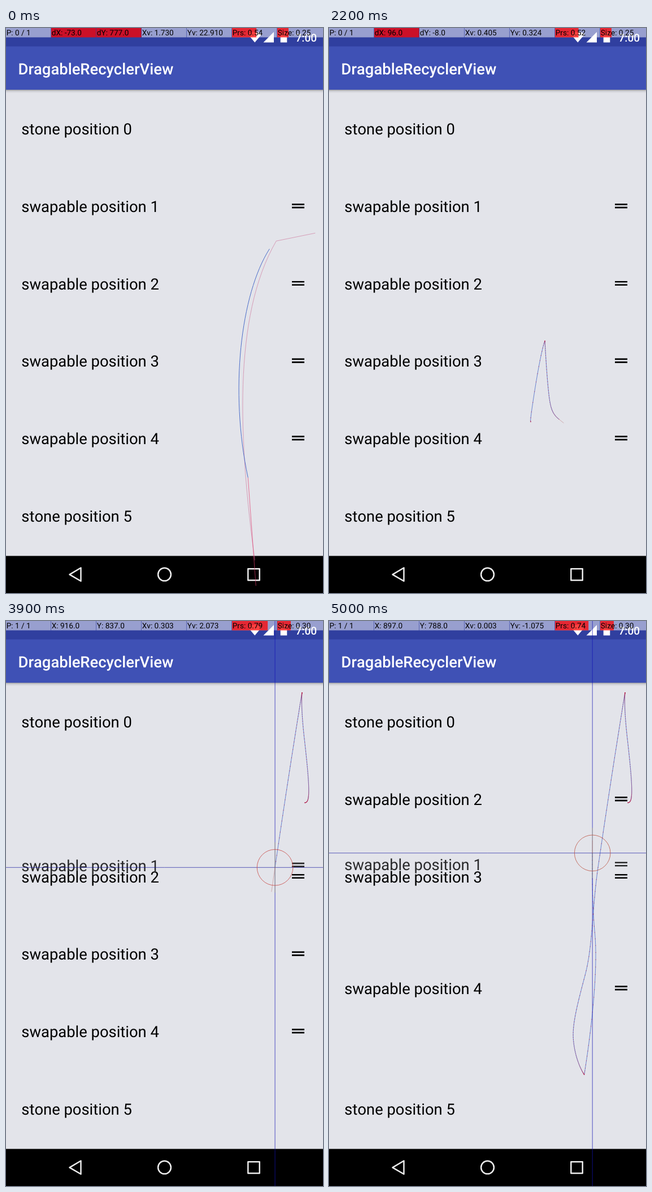
Animation, 561 px wide and 998 px high, one loop 5100 ms. Source, as an HTML page with a canvas:

```html
<!DOCTYPE html>
<html lang="en">
<head>
<meta charset="utf-8">
<title>Draggable list</title>
<style>
  html, body { margin: 0; width: 100%; height: 100%; overflow: hidden; background: #000; }
  svg, canvas { position: absolute; left: 0; top: 0; width: 561px; height: 998px; display: block; }
  text {
    font-family: Roboto, "Noto Sans", sans-serif; white-space: pre;
    font-kerning: none; text-rendering: geometricPrecision;
  }
  .row text { font-size: 27.4px; }
  .title { font-size: 27.4px; font-weight: 500; fill: #fff; }
  .clock { font-size: 19.1px; font-weight: 500; fill: #fff; }
  .cell text { font-size: 13.6px; }
</style>
</head>
<body>
<svg viewBox="0 0 561 998">
  <defs>
    <linearGradient id="shade" x2="0" y2="1">
      <stop offset="0" stop-color="#000" stop-opacity=".32"/>
      <stop offset=".4" stop-color="#000" stop-opacity=".1"/>
      <stop offset="1" stop-color="#000" stop-opacity="0"/>
    </linearGradient>
  </defs>
  <rect width="561" height="998" fill="#e3e4ea"/>
  <g id="rows"></g>
  <rect y="109" width="561" height="6" fill="url(#shade)"/>
  <rect y="32" width="561" height="77" fill="#3f51b5"/>
  <rect width="561" height="32.5" fill="#303f9f"/>
  <text class="title" x="21.5" y="81.5">DragableRecyclerView</text>
  <g fill="#fff">
    <path d="M440.3 25.5 L428 11 Q440.3 2 452.5 11Z"/>
    <path d="M455.5 25.5 H474 V7Z"/>
    <path d="M485.7 9 H489 V7 H494 V9 H497.3 V25.5 H485.7Z"/>
  </g>
  <text class="clock" x="512.5" y="24">7:00</text>
  <g id="cells"></g>
  <rect y="932.5" width="561" height="65.5" fill="#000"/>
  <g fill="none" stroke="#ececec" stroke-width="2.5" stroke-linejoin="round">
    <path d="M112.5 965.3 L132.5 953.5 V977Z"/>
    <circle cx="280.5" cy="965.2" r="11.4"/>
    <rect x="428.3" y="955.2" width="20.4" height="20.4"/>
  </g>
</svg>
<canvas width="561" height="998"></canvas>
<script>
const LOOP = 5100, STEP = 100, FIRST = 177.6, PITCH = 136.7;
const SX = 561 / 1080, SY = 998 / 1920;

// A gesture runs smoothly through keys of time, device position, velocity and pressure
const key = (t, x, y, vx, vy, prs) => ({ t, x, y, vx, vy, prs });
const SCROLL = [
  key(1540, 687, 1337, 0, 0, .6),
  key(1600, 694, 1272, .6, -3.946, .64),
  key(1740, 735, 1063, 0, 0, .6),
  key(1970, 748, 1240, .1, .9, .56),
  key(2140, 783, 1329, .405, .324, .52)
];
const DRAG = [
  key(2600, 1017, 617, .1, 0, .6),
  key(3100, 1016, 400, -.13, -1.131, .71),
  key(3400, 1008, 243, 0, 0, .75),
  key(3900, 916, 837, -.303, 2.073, .79),
  key(4100, 872, 1203, -.4, 1.5, .78),
  key(4300, 832, 1422, .066, .763, .76),
  key(4600, 869, 1541, 0, 0, .75),
  key(4850, 905, 1058, -.2, -2.1, .75),
  key(5000, 897, 788, .003, -1.075, .74)
];
const SWAPS = [
  { row: 2, start: 3930, dir: -1 }, { row: 3, start: 4101, dir: -1 },
  { row: 4, start: 4330, dir: -1 }, { row: 4, start: 4884, dir: 1 }
];

const ctx = document.querySelector('canvas').getContext('2d');
const clamp = (v, lo = 0, hi = 1) => Math.max(lo, Math.min(hi, v));

function make(tag, parent, attrs, label) {
  const el = document.createElementNS('http://www.w3.org/2000/svg', tag);
  for (const k in attrs) el.setAttribute(k, attrs[k]);
  if (label) el.textContent = label;
  return parent.appendChild(el);
}

// The row that gets dragged comes last, on top
const rowBox = document.getElementById('rows');
const rows = [0, 2, 3, 4, 5, 6, 1].map(i => {
  const el = make('g', rowBox, { class: 'row' });
  const stone = i % 5 === 0;
  make('text', el, { x: 27.3, y: 10.6 }, (stone ? 'stone' : 'swapable') + ' position ' + i);
  if (!stone) make('path', el, { d: 'M506 -4.1h22v2.7h-22zM506 1.4h22v2.7h-22z' });
  return { i, el };
});

const cellBox = document.getElementById('cells');
const cells = Array.from({ length: 7 }, (_, i) => {
  const el = make('g', cellBox, { class: 'cell', transform: `translate(${i * 80} 0)` });
  return {
    back: make('rect', el, { width: i === 6 ? 81 : 79.4, height: 16.5 }),
    bar: make('rect', el, { height: 16.5, fill: '#f00', 'fill-opacity': .75 }),
    text: make('text', el, { x: .8, y: 13 })
  };
});

// Cubic Hermite position and velocity
function sample(keys, t) {
  let i = 0;
  while (i < keys.length - 2 && t >= keys[i + 1].t) i++;
  const a = keys[i], b = keys[i + 1], h = b.t - a.t;
  const u = clamp((t - a.t) / h), w = 1 - u;
  const place = (p, q, v, z) =>
    w * w * (1 + 2 * u) * p + u * u * (3 - 2 * u) * q + h * u * w * (w * v - u * z);
  const speed = (p, q, v, z) =>
    6 * u * w * (q - p) / h + w * (1 - 3 * u) * v + u * (3 * u - 2) * z;
  return {
    x: place(a.x, b.x, a.vx, b.vx), y: place(a.y, b.y, a.vy, b.vy),
    vx: speed(a.x, b.x, a.vx, b.vx), vy: speed(a.y, b.y, a.vy, b.vy),
    prs: a.prs + (b.prs - a.prs) * u
  };
}

function stroke(path, color, width = .8) {
  ctx.strokeStyle = color;
  ctx.lineWidth = width;
  ctx.stroke(new Path2D(path));
}

function drawTrace(keys, end) {
  let path = '';
  ctx.fillStyle = 'rgba(190,20,60,.75)';
  const dots = [];
  for (let t = keys[0].t; t <= end; t += 10) {
    const p = sample(keys, t), x = p.x * SX, y = p.y * SY;
    path += (path ? 'L' : 'M') + x + ' ' + y;
    dots.push([x, y]);
  }
  stroke(path, 'rgba(45,85,195,.85)');
  for (const [x, y] of dots) ctx.fillRect(x - .55, y - .55, 1.1, 1.1);
}

function drawAim(p) {
  const reach = 40;
  stroke(`M${p.x * SX} ${p.y * SY}l${p.vx * reach * SX} ${p.vy * reach * SY}`, 'rgba(185,110,110,.6)');
}

function drawFling() {
  stroke('M547 362L478 376C400 510 412 730 440 940', 'rgba(205,110,150,.75)');
  stroke('M466 390C415 470 395 640 428 794', '#4a6cc8', 1);
  stroke('M428 794L442 985', 'rgba(225,60,110,.85)');
}

function drawFinger(p, size) {
  const x = p.x * SX, y = p.y * SY, r = size * 106, level = Math.round(p.prs * 255);
  stroke(`M${x} -1V999`, 'rgba(20,20,180,.8)', .9);
  stroke(`M-1 ${y}H562`, 'rgba(20,20,160,.75)', .9);
  stroke(`M${x} ${y - r * 1.4}v${r * 2.8}`, 'rgba(195,195,95,.6)', 1);
  drawAim(p);
  ctx.beginPath();
  ctx.arc(x, y, r, 0, 7);
  ctx.strokeStyle = `rgba(${level},${275 - level},70,.9)`;
  ctx.lineWidth = .9;
  ctx.stroke();
}

function showCells(down, a, b, { vx, vy, prs }, size) {
  const mark = down ? '' : 'd';
  const texts = [
    `P: ${down ? 1 : 0} / 1`,
    `${mark}X: ${a.toFixed(1)}`,
    `${mark}Y: ${b.toFixed(1)}`,
    'Xv: ' + Math.abs(vx).toFixed(3),
    'Yv: ' + vy.toFixed(3),
    'Prs: ' + prs.toFixed(2),
    'Size: ' + size.toFixed(2)
  ];
  const hot = [0, !down && Math.abs(a) > 20, !down && Math.abs(b) > 20];
  cells.forEach((cell, i) => {
    cell.text.textContent = texts[i];
    cell.back.setAttribute('fill', hot[i] ? '#f00' : '#fff');
    cell.back.setAttribute('fill-opacity', hot[i] ? .75 : .5);
    cell.bar.setAttribute('width', i === 5 ? prs * 80 : i === 6 ? size * 80 : 0);
  });
}

function slotOf(i, t) {
  return SWAPS.filter(s => s.row === i).reduce((slot, s) =>
    slot + s.dir * (1 - Math.cos(Math.PI * clamp((t - s.start) / 250))) / 2, i);
}

function placeRows(t, scroll, dragY) {
  for (const { i, el } of rows) {
    const held = i === 1 && dragY !== null;
    const y = held ? dragY : FIRST + PITCH * slotOf(i, t) - scroll;
    el.setAttribute('transform', `translate(0 ${y.toFixed(2)})`);
    el.setAttribute('opacity', held ? .82 : 1);
  }
}

function render(t) {
  ctx.setTransform(1, 0, 0, 1, 0, 0);
  ctx.clearRect(0, 0, 561, 998);
  ctx.translate(SX / 2, SY / 2);
  let scroll = 0, dragY = null;
  if (t < 1600) {
    drawFling();
    showCells(false, -73, 777, { vx: 1.73, vy: 22.91, prs: .54 }, .25);
  } else if (t >= 2200 && t < 2600) {
    const from = SCROLL[0], p = sample(SCROLL, t);
    drawTrace(SCROLL, 2140);
    drawAim(p);
    showCells(false, p.x - from.x, p.y - from.y, p, .25);
  } else {
    const keys = t < 2200 ? SCROLL : DRAG, p = sample(keys, t);
    const size = clamp(.2 + 1.3 * (p.prs - .64), .2, .3);
    const moved = (p.y - keys[0].y) * SY;
    if (keys === SCROLL) {
      scroll = Math.max(0, -moved - p.vy * SY * 2.5);
    } else {
      // Once rows begin to swap, the held row trails the finger
      const delay = 43 * clamp((t - 3900) / 200);
      dragY = FIRST + PITCH + moved + 2.3 - p.vy * SY * delay;
    }
    drawTrace(keys, t);
    drawFinger(p, size);
    showCells(true, Math.round(p.x), Math.round(p.y), p, size);
  }
  placeRows(t, scroll, dragY);
}

const begin = performance.now();
let shown = -1;
function tick() {
  const t = Math.floor(((performance.now() - begin) % LOOP) / STEP) * STEP;
  if (t !== shown) render(shown = t);
  requestAnimationFrame(tick);
}
tick();
</script>
</body>
</html>
```
